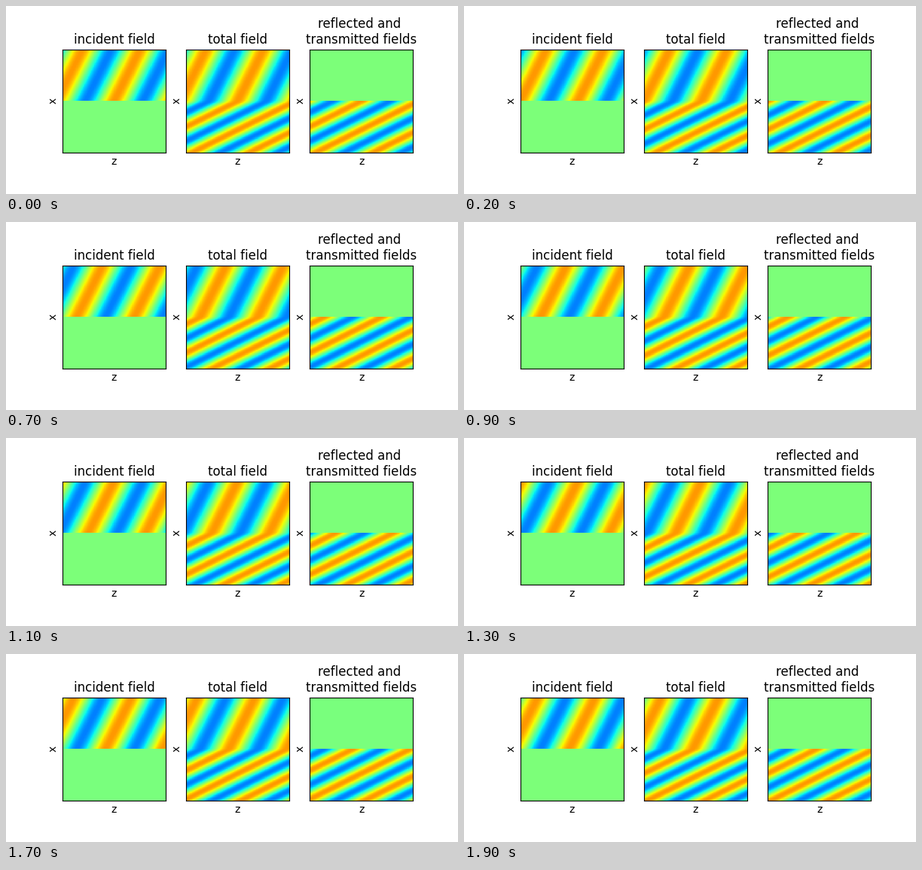
A matplotlib script that plays this animation: 600 by 250 pixels, repeating every 2000 ms.

```python
import numpy as np
import matplotlib.pyplot as plt
from matplotlib.animation import FuncAnimation

FRAMES = 20
INTERVAL = 100
N = 200

# Plane wave hitting the interface x = 0 at Brewster's angle: no reflection.
n1, n2 = 1.0, 2.0
theta1 = np.arctan(n2 / n1)
theta2 = np.arcsin(n1 / n2 * np.sin(theta1))
k1 = 2 * np.pi * n1
k2 = 2 * np.pi * n2
kz = k1 * np.sin(theta1)

z, x = np.meshgrid(np.linspace(-1, 1, N), np.linspace(-1, 1, N))
upper = x < 0
kx = np.where(upper, k1 * np.cos(theta1), k2 * np.cos(theta2))
phase = kz * z + kx * x


def fields(frame):
    total = np.cos(phase - 2 * np.pi * frame / FRAMES)
    return np.where(upper, total, 0), total, np.where(upper, 0, total)


plt.rcParams["font.family"] = "DejaVu Sans"
fig, axes = plt.subplots(1, 3, figsize=(6, 2.5), dpi=100, facecolor="white")
fig.subplots_adjust(left=0.125, right=0.9, bottom=0.11, top=0.88, wspace=0.2)

titles = ["incident field", "total field",
          "reflected and \ntransmitted fields"]
images = []
for ax, title, data in zip(axes, titles, fields(0)):
    images.append(ax.imshow(data, cmap="jet", vmin=-2, vmax=2,
                            interpolation="nearest"))
    ax.set_title(title, fontsize=12)
    ax.set_xlabel("z", fontsize=10)
    ax.set_ylabel("x", fontsize=10)
    ax.set_xticks([])
    ax.set_yticks([])


def update(frame):
    for image, data in zip(images, fields(frame)):
        image.set_data(data)
    return images


anim = FuncAnimation(fig, update, frames=FRAMES, interval=INTERVAL,
                     repeat=True, repeat_delay=0, blit=False)
plt.show()
```
